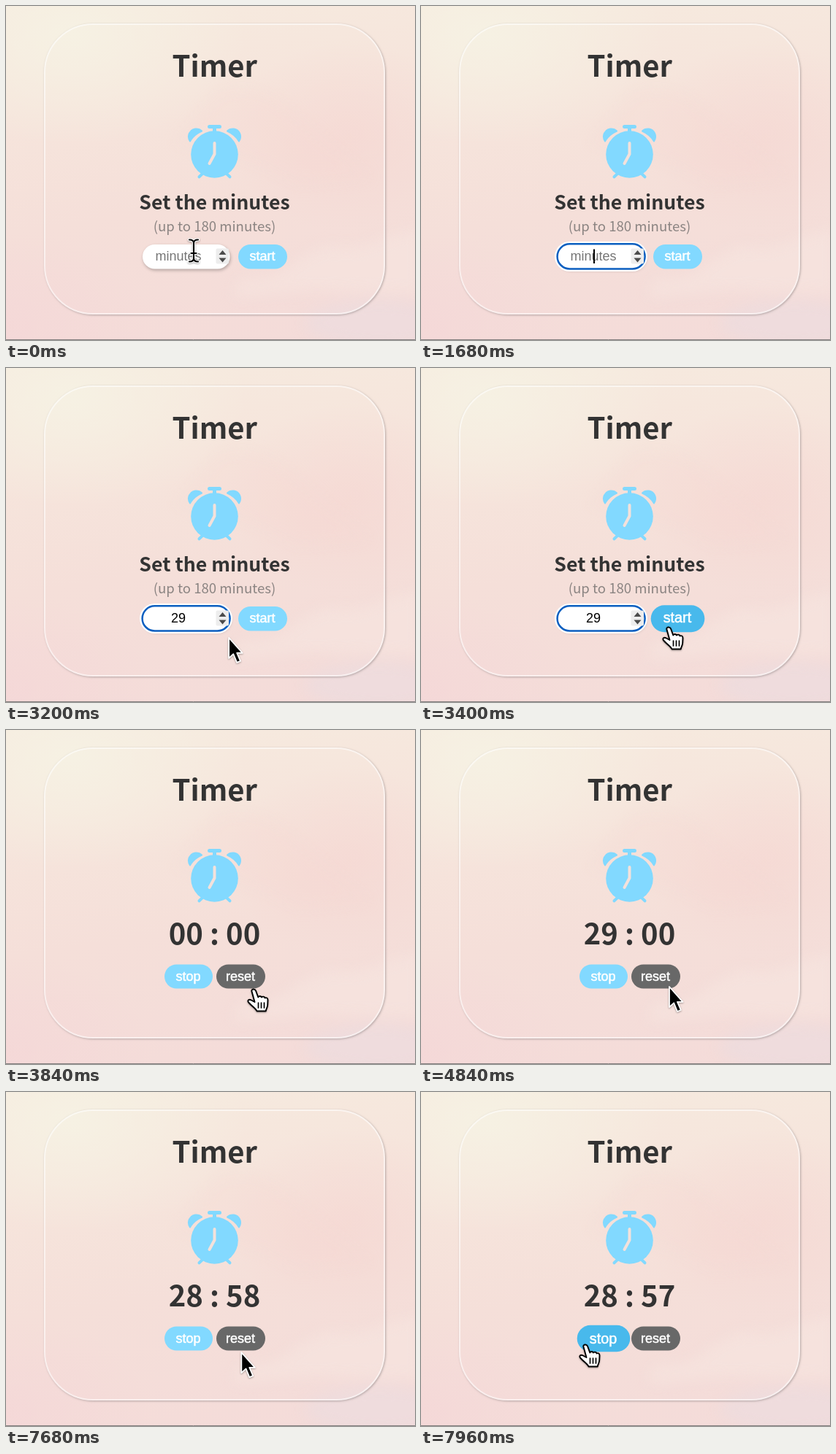
Write an HTML page that moves like this. It is 560 px wide and 458 px high and loops after 8 s.

```html
<!DOCTYPE html>
<html lang="en">
<head>
<meta charset="utf-8">
<title>Timer</title>
<style>
  html, body { margin: 0; width: 100%; height: 100%; overflow: hidden; }
  body {
    background:
      radial-gradient(ellipse 170px 130px at 470px 180px, #f5d5d199, #f5d5d100),
      radial-gradient(ellipse 240px 150px at 90px 40px, #f6f1e3, #f6f1e300),
      radial-gradient(ellipse 200px 130px at 0 440px, #f4d6d7aa, #f4d6d700),
      linear-gradient(172deg, #f6ebdf 0%, #f6e5dc 28%, #f5dfd9 58%, #f4dbd9 100%);
  }
  svg { position: absolute; left: 0; top: 0; display: block; }
  text { text-anchor: middle; font-family: "Liberation Sans", Arial, sans-serif; font-size: 18px; }
  .head { font-family: "Noto Sans CJK JP", "Noto Sans CJK KR", "Noto Sans CJK SC", "Noto Sans CJK", "Noto Sans", sans-serif; fill: #333; font-weight: 700; font-size: 40px; }
  .sub { font-size: 26.7px; }
  .hint { font-size: 18.6px; font-weight: 400; fill: #8b8482; }
  .button { fill: #fff; stroke: #fff; stroke-width: .5; }
  .card {
    position: absolute; left: 52px; top: 23.5px; width: 467px; height: 399px; box-sizing: border-box;
    border: 2px solid #ffffff8c; border-radius: 67px; box-shadow: 1px 1px 3px #8a808099;
  }
  .soft { filter: blur(9px); }
  .field { filter: drop-shadow(1px 2px 2px #0004); }
  .cursor { stroke-linejoin: round; stroke-linecap: round; filter: drop-shadow(0 1px 1px #0005); }
</style>
</head>
<body>
<svg width="560" height="458" viewBox="0 0 560 458">
  <g class="soft">
    <path d="M570 306 Q530 312 500 324 T445 328 Q415 335 390 356 T320 374 L310 400 L420 390 L570 395Z" fill="#f8e8e2" opacity=".5"/>
    <path d="M290 120 Q340 100 385 140 T500 235 L400 245 Q330 200 230 190Z" fill="#f4d6d1" opacity=".22"/>
    <ellipse cx="510" cy="435" rx="100" ry="32" fill="#ecdddf" opacity=".6"/>
  </g>
  <path d="M0 457.5H560" stroke="#858080"/>
</svg>
<div class="card"></div>
<svg width="560" height="458" viewBox="0 0 560 458">
  <text class="head" x="285.7" y="97">Timer</text>

  <g fill="#82d9ff" stroke="#82d9ff" stroke-linecap="round" stroke-linejoin="round">
    <circle cx="285.5" cy="203.5" r="32.3" stroke="none"/>
    <path d="M278.500 165.500H292.500M285.500 167V173" stroke-width="5"/>
    <path id="bell" d="M252 185.500C247 177.500 252 169.500 259 168.500Q265 168 268 171.500Q257 176.500 252 185.500Z" stroke-width="2"/>
    <use href="#bell" transform="matrix(-1 0 0 1 571 0)"/>
    <path d="M269 230L264.500 234.300M302 230L306.500 234.300" stroke-width="4"/>
    <path d="M285.500 188V203L278.500 216" fill="none" stroke="#f4e1db" stroke-width="4"/>
  </g>

  <g id="setup">
    <text class="head sub" x="285.5" y="278.5">Set the minutes</text>
    <text class="head hint" x="285.5" y="308.7">(up to 180 minutes)</text>
    <rect class="field" x="187" y="327" width="119.500" height="33.500" rx="16.750" fill="#fff"/>
    <g id="focus">
      <rect x="183" y="323" width="127" height="41" rx="20.500" fill="#fff"/>
      <rect x="186.600" y="326.300" width="120" height="34.200" rx="17.100" fill="#fff" stroke="#0b5fc0" stroke-width="2.500"/>
    </g>
    <rect x="287.500" y="332.500" width="17.500" height="21" rx="2" fill="#ededed"/>
    <path d="M291.500 341L296.500 335L301.500 341ZM291.500 345.500L296.500 351.500L301.500 345.500Z" fill="#4b4b4b"/>
    <text id="entry" x="236" y="349"></text>
    <path id="caret" d="M0 333.500V353" stroke="#000" stroke-width="2"/>
    <g id="start"><rect x="318" y="327" width="67" height="33.500" rx="16.750"/><text class="button" x="351" y="348.500">start</text></g>
  </g>

  <g id="running">
    <text id="clock" class="head" x="285.500" y="294"></text>
    <g id="stop"><rect x="217" y="321.500" width="66" height="33" rx="16.500"/><text class="button" x="249.500" y="344">stop</text></g>
    <rect x="288" y="321.500" width="67" height="33" rx="16.500" fill="#686868"/>
    <text class="button" x="321" y="344">reset</text>
  </g>

  <g id="ibeam" class="cursor" fill="none">
    <path id="beam" d="M-6 -14.500Q0 -14.500 0 -10Q0 -14.500 6 -14.500M0 -10V11M-6 15.500Q0 15.500 0 11Q0 15.500 6 15.500M-3.500 4H3.500"/>
    <use href="#beam" stroke="#fff" stroke-width="4.500"/>
    <use href="#beam" stroke="#000" stroke-width="2.200"/>
  </g>
  <path id="arrow" class="cursor" d="M0 0V28L6.200 22.300L11 34L15.800 32L11 20.800H18.500Z" fill="#000" stroke="#fff" stroke-width="1.800"/>
  <g id="hand" class="cursor" stroke="#000" stroke-width="1.900">
    <path d="M-3.500 6.500C-4.500 3 .5 2.500 2 5.500L5.300 14.500C6 12.500 9 12.500 10 14.500C11 13 14 13.500 14.600 15.500C16.500 14.500 18.600 15.500 18.500 18.500L18.200 25C18 29 16.200 30 15.700 33.500H3.500C2 30 -3 27 -7 22.500C-10.500 19 -7.500 16.500 -4 18.500L.5 21Z" fill="#fff"/>
    <path d="M5.500 22V29M9.500 22V29M13.500 22V29" stroke-width="1.700"/>
  </g>
</svg>
<script>
const LOOP = 8000;
const el = Object.fromEntries([...document.querySelectorAll('[id]')].map(n => [n.id, n]));
const show = (node, on) => { node.style.display = on ? '' : 'none'; };
const ramp = (t, from, to) => Math.min(1, Math.max(0, (t - from) / (to - from)));
const smooth = p => p * p * (3 - 2 * p);
const within = (t, from, to) => t >= from && t < to;

const quad = (p, a, b, c) => [0, 1].map(i =>
  (1 - p) ** 2 * a[i] + 2 * p * (1 - p) * b[i] + p * p * c[i]);

function pointer(t) {
  if (t < 3840) return quad(smooth(ramp(t, 2960, 3400)), [257, 335], [300, 395], [340, 352]);
  return quad(smooth(ramp(t, 7600, 7920)), [340, 352], [285, 372], [226, 343]);
}

function pointerKind(t, [x, y]) {
  if (within(t, 1160, 2960)) return 'none';
  if (within(t, 3290, 3880) || t >= 7820) return 'hand';
  return t < 3290 && x < 307 && y < 361 ? 'ibeam' : 'arrow';
}

function hover(button, cx, cy, amount) {
  const scale = 1 + 0.1 * amount;
  button.setAttribute('transform', `translate(${cx} ${cy}) scale(${scale}) translate(${-cx} ${-cy})`);
  const mix = (from, to) => Math.round(from + (to - from) * amount);
  button.firstElementChild.setAttribute('fill', `rgb(${mix(130, 72)},${mix(217, 185)},${mix(255, 236)})`);
}

function clockText(t) {
  if (t < 4840) return '00 : 00';
  const left = 29 * 60 - Math.floor((t - 4840) / 1000);
  return [Math.floor(left / 60), left % 60].map(n => String(n).padStart(2, '0')).join(' : ');
}

function render(t) {
  const running = t >= 3840;
  show(el.setup, !running);
  show(el.running, running);
  show(el.focus, t >= 400);

  const typed = t < 1920 ? '' : t < 2280 ? '2' : '29';
  el.entry.textContent = typed || 'minutes';
  el.entry.setAttribute('fill', typed ? '#000' : '#757575');
  el.caret.setAttribute('transform', `translate(${237 + typed.length * 5} 0)`);
  show(el.caret, within(t, 400, 900) || within(t, 1400, 2960) || t >= 3460);

  hover(el.start, 351.3, 343.5, ramp(t, 3280, 3390));
  hover(el.stop, 250, 338, ramp(t, 7820, 7940));
  el.clock.textContent = clockText(t);

  const at = pointer(t), kind = pointerKind(t, at);
  for (const name of ['ibeam', 'arrow', 'hand']) {
    show(el[name], name === kind);
    el[name].setAttribute('transform', `translate(${at[0]} ${at[1]})`);
  }
}

function frame() {
  render(performance.now() % LOOP);
  requestAnimationFrame(frame);
}
frame();
</script>
</body>
</html>
```
